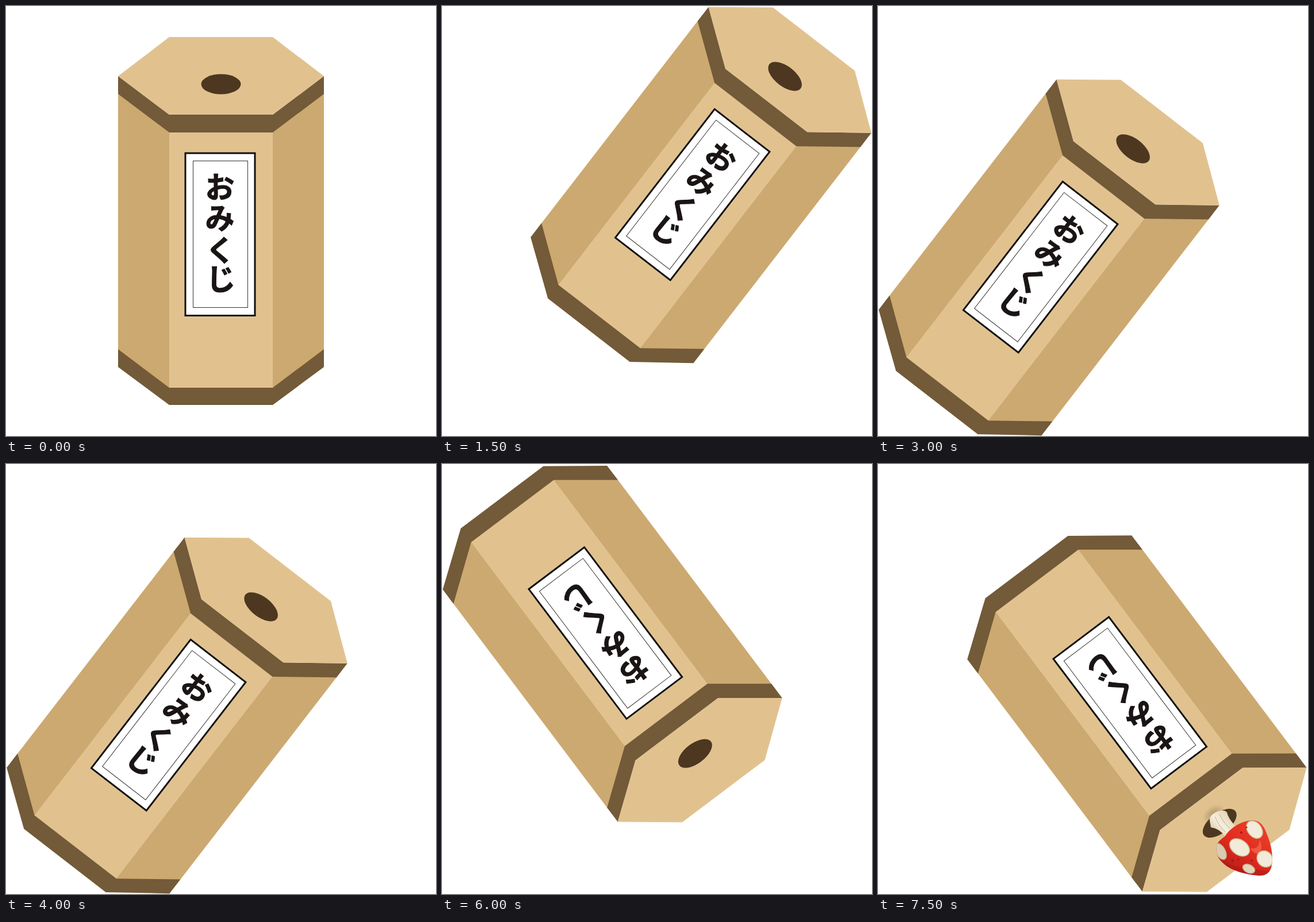
Recreate the animation shown at these times as an HTML page. Size 748x748 px, loop 8 s.

```html
<!DOCTYPE html>
<html lang="ja">
<head>
<meta charset="utf-8">
<title>おみくじ</title>
<style>
html, body { margin: 0; width: 100%; height: 100%; overflow: hidden; background: #fff; }
svg { display: block; width: 100vw; height: 100vh; }
.front { fill: #e1c28f; }
.side { fill: #cca970; }
.trim { fill: #735a38; }
.kana { font: 900 51px "Noto Sans CJK JP", "Noto Sans CJK", sans-serif; text-anchor: middle;
  fill: #1a1514; stroke: #1a1514; stroke-width: 1; stroke-linejoin: round; }
</style>
</head>
<body>
<svg viewBox="0 0 748 748">
  <defs>
    <linearGradient id="cap" x1="1" y1="0" x2=".3" y2="1">
      <stop offset="0" stop-color="#f0442c"/>
      <stop offset=".6" stop-color="#df2c1f"/>
      <stop offset="1" stop-color="#b51a17"/>
    </linearGradient>
    <linearGradient id="stem" x1="0" y1="1" x2="1" y2="0">
      <stop offset="0" stop-color="#c9b795"/>
      <stop offset=".45" stop-color="#f6eedc"/>
      <stop offset="1" stop-color="#d8c7a6"/>
    </linearGradient>
    <radialGradient id="shade">
      <stop offset="0" stop-color="#6b5130" stop-opacity=".4"/>
      <stop offset="1" stop-color="#6b5130" stop-opacity="0"/>
    </radialGradient>
    <clipPath id="capClip"><use href="#capShape"/></clipPath>
  </defs>

  <!-- Box, drawn around its own centre -->
  <g id="box">
    <g transform="translate(-374 -375)">
      <path class="side" d="M195 140L290 208V676L195 610ZM553 140L458 208V676L553 610Z"/>
      <path class="front" d="M284 205H464V675H284Z"/>
      <path class="trim" d="M195 122L284 189H464L553 122V153L464 220H284L195 153Z"/>
      <path class="trim" d="M195 597L284 664H464L553 597V628L464 694H284L195 628Z"/>
      <path class="front" d="M284 54H464L553 122L464 189H284L195 122Z"/>
      <ellipse cx="374" cy="136" rx="34.5" ry="17.5" fill="#4d3721"/>
      <rect x="312" y="256" width="121" height="282.5" fill="#fff" stroke="#111" stroke-width="3"/>
      <rect x="325.5" y="269.5" width="95" height="255" fill="none" stroke="#333" stroke-width="1"/>
      <g class="kana">
        <text x="372" y="334">お</text>
        <text x="372" y="388">み</text>
        <text x="373" y="444">く</text>
        <text x="374" y="494">じ</text>
      </g>
    </g>
  </g>

  <g id="mushroom">
    <ellipse cx="584" cy="609" rx="22" ry="15" fill="url(#shade)" transform="rotate(-37 584 609)"/>
    <path fill="url(#stem)" d="M577 620Q576 611 589 605Q602 600 607 606Q609 616 621 629L604 648Q594 634 579 632Z"/>
    <path fill="none" stroke="#c4b08a" stroke-width="1" d="M586 613Q592 628 604 640M594 609Q600 623 612 634"/>
    <path id="capShape" fill="url(#cap)" d="M604 647C612 634 630 622 648 620C664 618 672 630 677 645C683 660 688 678 685 698C683 711 674 717 662 716C640 714 614 708 600 694C590 685 586 674 590 662C593 654 599 652 604 647Z"/>
    <g clip-path="url(#capClip)">
      <path d="M588 682C612 704 648 704 686 708V722H588Z" fill="#a81614" opacity=".4"/>
      <path d="M648 668Q662 672 664 654Q672 672 660 678Q652 677 648 668Z" fill="#f4624a" opacity=".8"/>
      <g fill="#f3ebd9" stroke="#cdb993" stroke-width="1.5">
        <ellipse cx="655" cy="636" rx="12" ry="17" transform="rotate(-38 655 636)"/>
        <ellipse cx="629" cy="667" rx="19" ry="13" transform="rotate(34 629 667)"/>
        <ellipse cx="673" cy="687" rx="13" ry="15" transform="rotate(-38 673 687)"/>
        <ellipse cx="596" cy="674" rx="8" ry="15" transform="rotate(-28 596 674)" fill="#d8cbb0"/>
        <ellipse cx="645" cy="704" rx="11" ry="7" transform="rotate(25 645 704)" fill="#e2d6bd"/>
      </g>
      <g fill="#a81614">
        <circle cx="632" cy="641" r="2"/><circle cx="617" cy="690" r="2.2"/>
        <circle cx="627" cy="688" r="1.8"/><circle cx="650" cy="690" r="1.8"/>
        <circle cx="641" cy="632" r="1.5"/>
      </g>
    </g>
  </g>
</svg>
<script>
const LOOP = 8000, STEP = 500;
const box = document.getElementById('box');
const mushroom = document.getElementById('mushroom');

// Each pose: centre x, centre y, angle
const poses = {
  rest: [374, 375, 0],
  tilt: [373.5, 374.5, 37.7],
  up: [450.5, 311.5, 37.7],
  down: [297.5, 437.5, 37.7],
  back: [296.5, 312.7, 143],
  pour: [450.5, 434, 143]
};
const shake = ('rest rest tilt up tilt up down up down up ' +
  'back pour back pour back pour').split(' ');

function draw(t) {
  const step = Math.floor((t % LOOP) / STEP);
  const [x, y, angle] = poses[shake[step]];
  box.setAttribute('transform', `translate(${x} ${y}) rotate(${angle})`);
  mushroom.style.display = step === shake.length - 1 ? '' : 'none';
}

const start = performance.now();
function tick(now) {
  draw(Math.max(0, now - start));
  requestAnimationFrame(tick);
}
draw(0);
requestAnimationFrame(tick);
</script>
</body>
</html>
```
